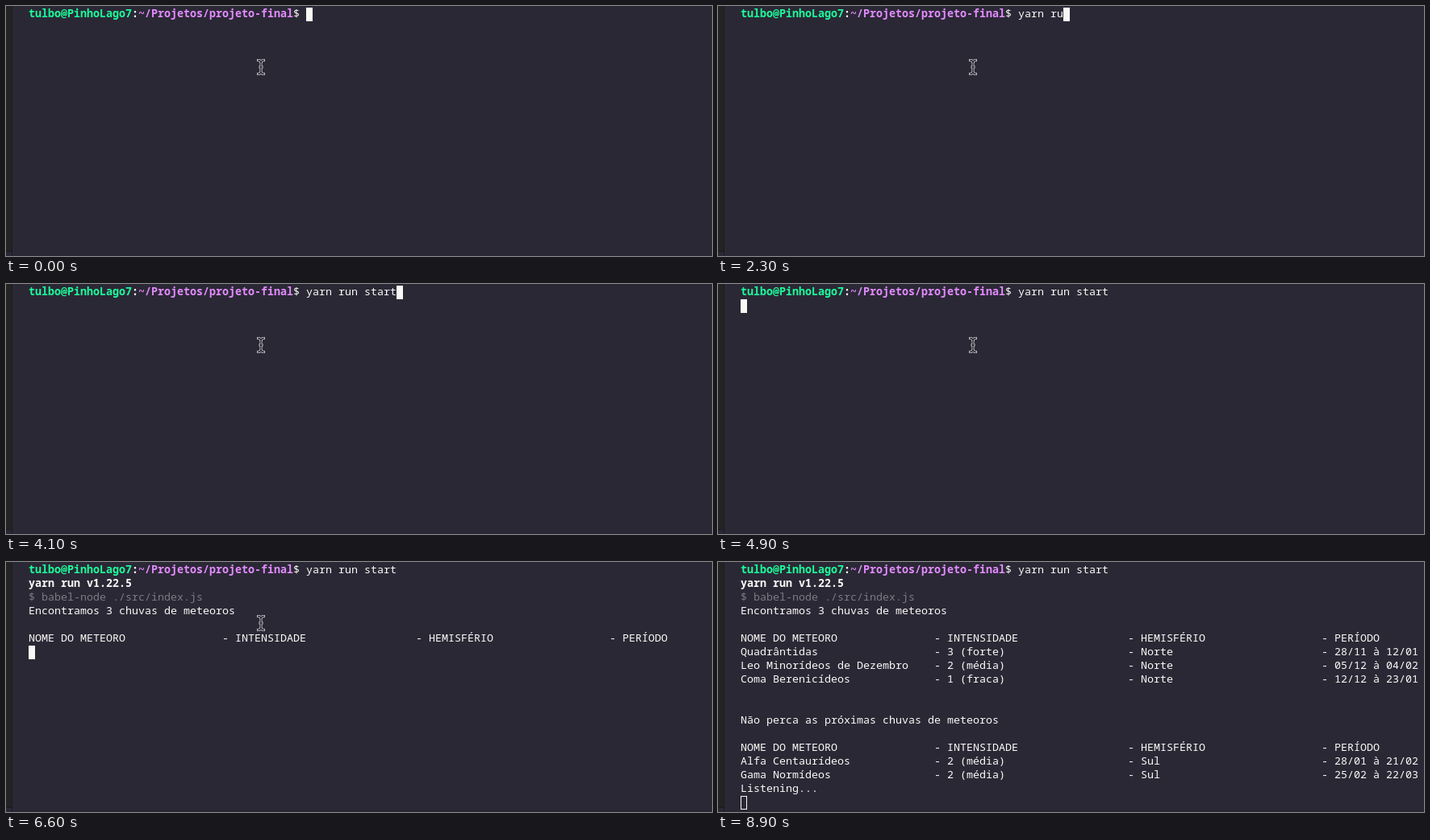
These frames come from a looping animation (875 by 311 pixels, 9000 ms). An HTML page:

```html
<!DOCTYPE html>
<html lang="pt">
<head>
<meta charset="utf-8">
<title>Terminal</title>
<style>
  html, body { margin: 0; width: 100%; height: 100%; overflow: hidden; background: #2b2836; }
  svg { display: block; }
  text {
    font: 13.333px "Noto Sans Mono", "DejaVu Sans Mono", monospace;
    font-variant-ligatures: none;
    white-space: pre;
    fill: #fbfaf6;
  }
  .bold { font-weight: 700; }
  .user { font-weight: 700; fill: #1cfd9b; }
  .path { font-weight: 700; fill: #e38bff; }
  .dim { fill: #7d7a83; }
</style>
</head>
<body>
<svg width="875" height="311" viewBox="0 0 875 311">
  <defs>
    <path id="beam" d="M312.5 67.5Q316 67.5 316 71Q316 67.5 319.5 67.5M316 71V81M312.5 84.5Q316 84.5 316 81Q316 84.5 319.5 84.5M315 76H317"/>
  </defs>
  <rect width="875" height="311" fill="#2b2836"/>
  <rect width="7" height="305" fill="#232323"/>
  <path d="M7.5 0V311M0 305.5H7" stroke="#1b1a20" fill="none"/>
  <g id="lines"></g>
  <rect id="caret" stroke="#f8f8f4"/>
  <g id="pointer" fill="none" stroke-linecap="square" stroke-linejoin="round">
    <use href="#beam" stroke="#d2d2d6" stroke-width="3"/>
    <use href="#beam" stroke="#25232d" stroke-width="1.4"/>
  </g>
</svg>
<script>
const LOOP = 9000, CELL = 8, ROW = 17, LEFT = 28, TOP = 2;
const COMMAND = "yarn run start";
const PROMPT = [
  ["tulbo@PinhoLago7", "user"], [":", "bold"],
  ["~/Projetos/projeto-final", "path"], ["$ ", ""]
];
const PROMPT_COLS = PROMPT.reduce((n, [s]) => n + s.length, 0);

// [time, characters typed]
const TYPING = [[0, 0], [300, 1], [600, 2], [1500, 4], [1900, 6], [2300, 7], [2900, 8],
  [3100, 9], [3500, 10], [3700, 11], [3800, 12], [4100, 14]];
// [time, caret row]
const CARET_ROWS = [[0, 0], [4900, 1], [5400, 2], [5500, 3], [6600, 6], [7000, 17]];

const HEADER = ["NOME DO METEORO", "INTENSIDADE", "HEMISFÉRIO", "PERÍODO"];
const OUTPUT = [
  ["yarn run v1.22.5", "bold"],
  ["$ babel-node ./src/index.js", "dim"],
  "Encontramos 3 chuvas de meteoros",
  "",
  HEADER,
  ["Quadrântidas", "3 (forte)", "Norte", "28/11 à 12/01"],
  ["Leo Minorídeos de Dezembro", "2 (média)", "Norte", "05/12 à 04/02"],
  ["Coma Berenicídeos", "1 (fraca)", "Norte", "12/12 à 23/01"],
  "",
  "",
  "Não perca as próximas chuvas de meteoros",
  "",
  HEADER,
  ["Alfa Centaurídeos", "2 (média)", "Sul", "28/01 à 21/02"],
  ["Gama Normídeos", "2 (média)", "Sul", "25/02 à 22/03"],
  "Listening..."
];

const $ = id => document.getElementById(id);

function write(col, row, string, style = "") {
  const el = document.createElementNS("http://www.w3.org/2000/svg", "text");
  el.setAttribute("x", LEFT + col * CELL);
  el.setAttribute("y", TOP + 12 + row * ROW);
  el.setAttribute("class", style);
  el.textContent = string;
  $("lines").append(el);
  return el;
}

function show(el, visible) {
  el.style.display = visible ? "" : "none";
}

function valueAt(steps, time) {
  let value = steps[0][1];
  for (const [start, next] of steps) if (time >= start) value = next;
  return value;
}

let col = 0;
for (const [string, style] of PROMPT) {
  write(col, 0, string, style);
  col += string.length;
}
const command = write(PROMPT_COLS, 0, "");

const output = OUTPUT.map((line, i) => {
  const row = i + 1;
  if (typeof line === "string") return [write(0, row, line)];
  if (line.length === 2) return [write(0, row, ...line)];
  return line.map((cell, c) => write(c * 30, row, (c ? "- " : "") + cell));
});

const caret = $("caret");
caret.setAttribute("width", CELL - 1);
caret.setAttribute("height", ROW - 1);

function draw(time) {
  const typed = valueAt(TYPING, time);
  const row = valueAt(CARET_ROWS, time);
  const hollow = time >= 8900;

  command.textContent = COMMAND.slice(0, typed);
  output.forEach((cells, i) => cells.forEach(el => show(el, i + 1 < row)));

  caret.setAttribute("x", LEFT + 0.5 + (row ? 0 : PROMPT_COLS + typed) * CELL);
  caret.setAttribute("y", TOP + 0.5 + row * ROW);
  caret.setAttribute("fill", hollow ? "none" : "#f8f8f4");

  show($("pointer"), time < 8200);
}

const began = performance.now();
function tick() {
  draw((performance.now() - began) % LOOP);
  requestAnimationFrame(tick);
}
tick();
</script>
</body>
</html>
```
